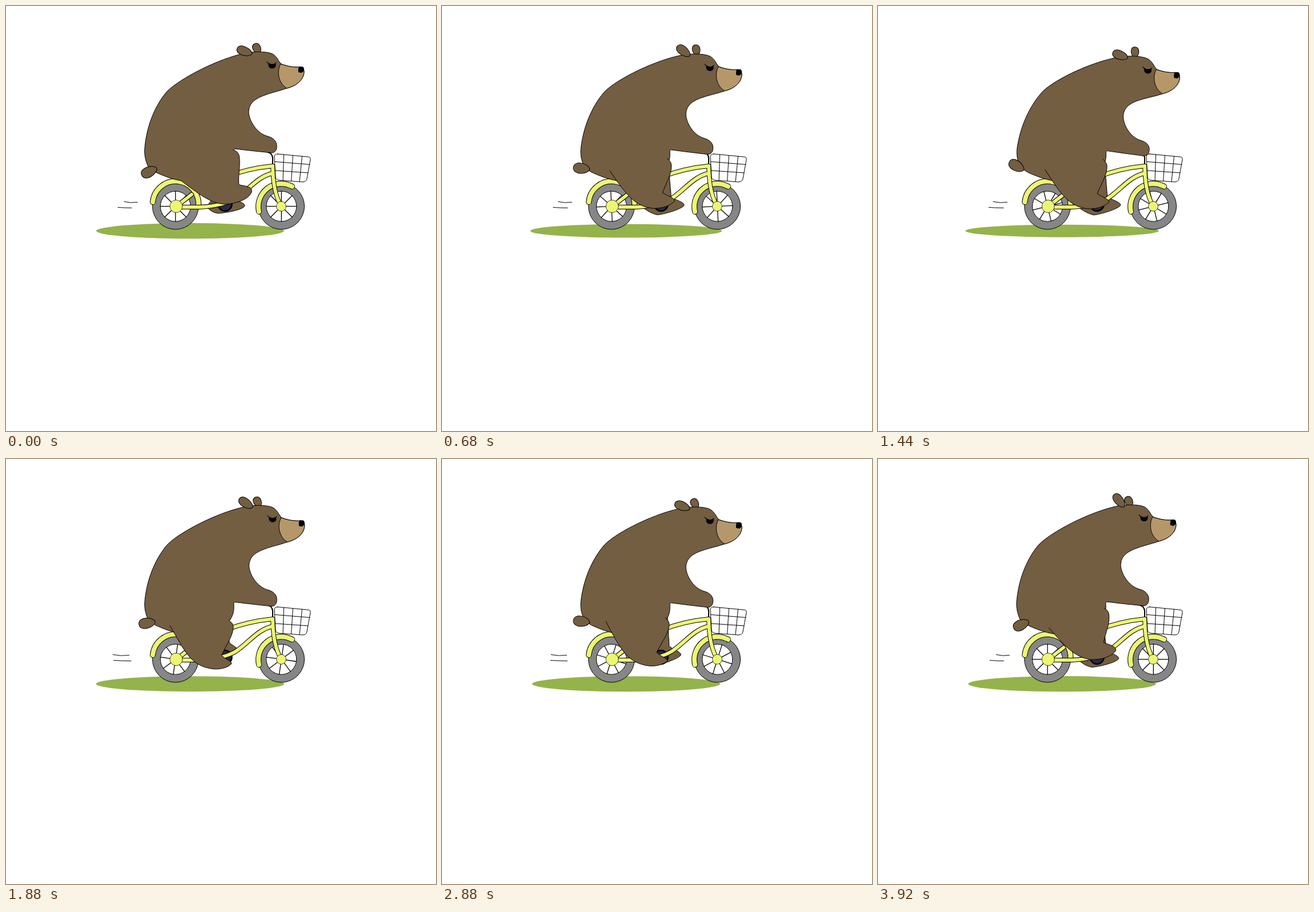
An HTML page with a canvas that plays this animation: 753 px wide and 744 px high, repeating every 3960 ms.

```html
<!DOCTYPE html>
<html lang="en">
<head>
<meta charset="utf-8">
<title>Cycling bear</title>
<style>
html, body { margin: 0; width: 753px; height: 744px; overflow: hidden; background: #fff; }
canvas { display: block; }
</style>
</head>
<body>
<canvas id="stage" width="753" height="744"></canvas>
<script>
const c = document.getElementById('stage').getContext('2d');
const LOOP = 3960, STEP = 40;
const PEDAL = 775, WHEEL = 784, BOB = 1100, BLINK = 573, SHADOW = 980, EAR = 159.6;
const FUR = '#735e42', TAN = '#b6976a', YELLOW = '#edf673', GREY = '#868686', GRASS = '#94b34b';

const BODY = `M250 283C243 270 242 257 243 248C246 213 259 178 279 153
  C295 133 360 97 412 84C427 80 455 78 467 84C476 90 477 97 482 101.5
  C497 107 506 107 515 107C524 108 523 118 519 126C513 136 503 141 492 144
  C478 149 462 152 448 158C432 165 425 173 425 187C427 205 442 224 458 228
  C470 231 475 239 474 247C474 253 470 257 465 257C445 255 425 253 401 250
  Q398 250 399 256Q400 270 392 282L370 301L307 306Q285 302 262 291Z`;
const MUZZLE = `M481 101.5C474 113 476 135 492 144C503 141 513 136 519 126
  C523 118 524 108 515 107C506 107 497 107 481 101.5Z`;
const NOSE = 'M513 106L519 106Q522 107 522 111Q521 116 517 117L512 116Q511 111 513 106Z';
const BROW = 'M457 98Q461 102 466 102.5Q471 102 473 99';

// leg at the top, middle and bottom of a pedal stroke
const NEAR = [
  'M307 306C345 335 360 345 383 347C405 346 425 338 430 326C432 317 424 316 408 313C406 300 410 285 409 268C409 256 402 253 398 252',
  'M287 279C312 330 325 352 360 358C375 360 388 355 395 350C394 345 380 342 375 334C385 315 398 300 398 286C397 278 394 280 392 274',
  'M287 295C313 335 320 365 364 370C378 371 392 366 395 360C394 354 386 354 378 346C388 325 398 310 398 296C397 288 394 288 390 284'
];
const FAR = [
  'M392 290L398 336C404 343 418 343 418 350C415 357 385 362 372 363C362 362 356 357 352 352Z',
  'M398 262L403 332C408 338 430 343 427 349C420 356 390 366 380 367C370 364 362 360 354 355Z',
  'M388 292L388 318C392 324 402 327 401 333C398 338 392 341 388 342C380 344 375 342 370 340Z'
];

const mix = (a, b, k) => a + (b - a) * k;
const clamp = k => Math.max(0, Math.min(1, k));
const wave = turns => Math.sin(Math.PI * turns) ** 2;
const swing = turns => 1 - Math.abs(1 - 2 * (turns % 1));

// leaning pushes high points forward and front points down
function bendPoint(x, y, lean) {
  const forward = clamp((262 - y) / 110), down = clamp((x - 300) / 180) * clamp((330 - y) / 120);
  return [x + 7.3 * lean * forward, y + 11 * lean * down];
}
const bend = (d, lean) => new Path2D(
  d.replace(/([\d.]+) ([\d.]+)/g, (_, x, y) => bendPoint(+x, +y, lean).join(' ')));

function morph(a, b, k) {
  const goal = b.match(/[\d.]+/g);
  let i = 0;
  return new Path2D(a.replace(/[\d.]+/g, v => mix(+v, +goal[i++], k)));
}
function leg(poses, progress) {
  const half = .45, i = progress < half ? 0 : 1;
  const k = i ? (progress - half) / (1 - half) : progress / half;
  return morph(poses[i], poses[i + 1], k ** .7);
}

function paint(path, fill, width = 1) {
  if (fill) { c.fillStyle = fill; c.fill(path); }
  if (width) { c.strokeStyle = '#000'; c.lineWidth = width; c.stroke(path); }
}
function oval(x, y, rx, ry = rx) {
  const path = new Path2D();
  path.ellipse(x, y, rx, ry, 0, 0, 2 * Math.PI);
  return path;
}
function tubes(width, ...shapes) {
  const path = new Path2D(shapes.join(' '));
  c.strokeStyle = '#000'; c.lineWidth = width + 2; c.stroke(path);
  c.strokeStyle = YELLOW; c.lineWidth = width; c.stroke(path);
}
function egg([x, y], deg, len, half) {
  c.save();
  c.translate(x, y);
  c.rotate(deg * Math.PI / 180);
  const w = half * 1.4;
  paint(new Path2D(`M0 0C${-len * .1} ${-half} ${-len} ${-w} ${-len} 0C${-len} ${w} ${-len * .1} ${half} 0 0Z`), FUR);
  c.restore();
}

function wheel(x, turn) {
  const y = 350.7, r = 26.5;
  paint(oval(x, y, 40.3), GREY);
  paint(oval(x, y, r), '#fff');
  const spokes = new Path2D();
  for (let i = 0; i < 8; i++) {
    const a = turn + i * Math.PI / 4;
    spokes.moveTo(x, y);
    spokes.lineTo(x + r * Math.cos(a), y + r * Math.sin(a));
  }
  paint(spokes, null, 1.3);
}

function basket() {
  const d = ['M476 259L528 264Q534 264 533 269L527 302Q526 308 519 308L478 305Q472 304 472 299L470 264Q470 259 476 259Z'];
  for (let i = 0; i < 3; i++) d.push(`M${486.5 + 16 * i} ${260 + 1.5 * i}L${485 + 14.5 * i} ${305 + i}`);
  for (let i = 0; i < 2; i++) d.push(`M471 ${272.5 + 15.5 * i}L${532 - 3 * i} ${277.5 + 14.5 * i}`);
  paint(new Path2D(d.join('')));
}

function bike(turn) {
  wheel(296.8, turn);
  wheel(482.3, turn);
  basket();
  paint(new Path2D('M467 280L467 266Q466 257 458 256'), null, 2);
  tubes(8, 'M257 343A40 40 0 0 1 337 351', 'M443 360A40 40 0 0 1 501 316');
  tubes(6, 'M298 351L325 330', 'M298 352L340 352Q380 350 402 337C425 322 440 299 466 293',
    'M385 299Q425 284 467 280', 'M467 281L468 300Q471 333 482 350');
  paint(oval(298, 350.7, 11), YELLOW, .7);
  paint(oval(482, 350.7, 8.5), YELLOW, .7);
}

function trails(k) {
  const x1 = mix(207, 185, k), x2 = mix(230, 214, k);
  const x3 = mix(196, 188, k), x4 = mix(220, 219, k);
  paint(new Path2D(`M${x1} 342.5Q${(x1 + x2) / 2} 345.5 ${x2} 343.5` +
    `M${x3} 352.5Q${(x3 + x4) / 2} 353.5 ${x4} 353.5`));
}

function face(lean, shut) {
  paint(bend(MUZZLE, lean), TAN);
  paint(bend(NOSE, lean), '#000', 0);
  const low = 101 + mix(8, 3.5, shut);
  paint(bend(`M460 101Q466 104 472 101Q473 ${low} 466 ${low}Q459 ${low} 460 101Z`, lean), '#000');
  paint(bend(BROW, lean), null, 1.2);
}

function draw(t) {
  const lean = t < 3 * BOB ? wave(Math.min(1, (t % BOB) / BOB / .8)) : 0;
  const shade = wave(t / SHADOW);
  const pedal = swing(t / PEDAL);
  const tail = lean && mix(.15, 1, lean);
  const beat = t / BLINK - .74;
  const shut = clamp(1.5 - 14 * Math.abs(beat - Math.round(beat)));

  c.fillStyle = '#fff';
  c.fillRect(0, 0, 753, 744);
  c.lineCap = c.lineJoin = 'round';

  paint(oval(322.5, 393.7, mix(164.5, 169.5, shade), mix(13.6, 11, shade)), GRASS, 0);
  trails(wave(t / WHEEL));
  paint(leg(FAR, pedal), FUR);
  paint(oval(383.5, 347, 12), '#292a48', 2.5);
  bike(t / WHEEL * 2 * Math.PI);

  egg(bendPoint(444, 83, lean), mix(62, 88, shade), 19, 7.5);
  paint(bend(BODY, lean), FUR);
  paint(leg(NEAR, pedal), FUR);
  egg([264 - 10 * tail, 284 + 4 * tail], mix(-25, 38, tail), 29, 10);
  egg(bendPoint(431, 84, lean), mix(20, 53, wave(t / EAR)), 28, 8.5);
  face(lean, shut);
}

const start = performance.now();
function tick() {
  const t = (performance.now() - start) % LOOP;
  draw(Math.floor(t / STEP) * STEP);
  requestAnimationFrame(tick);
}
tick();
</script>
</body>
</html>
```
